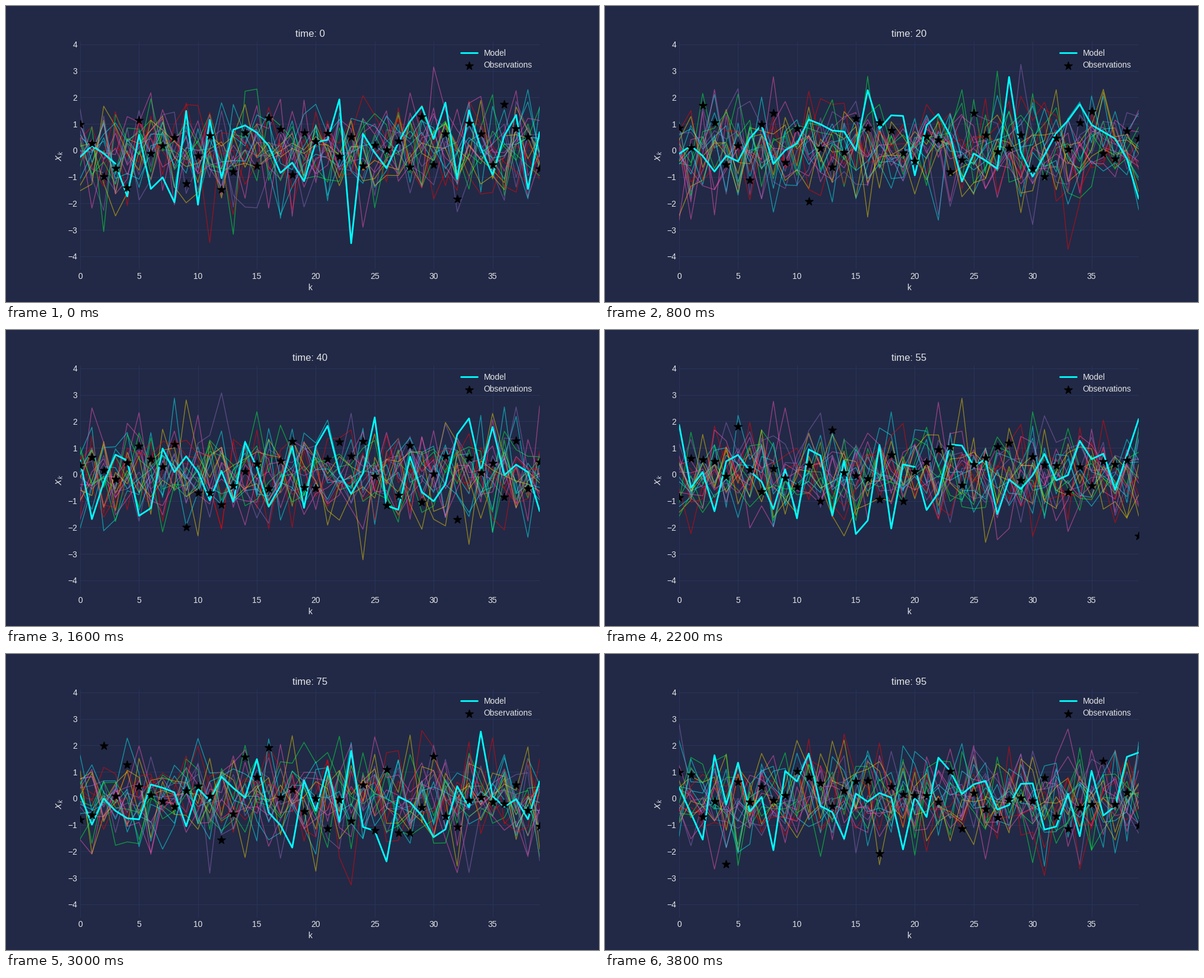
Write a matplotlib script that moves like this. It is 1000 by 500 pixels and loops after 4 s.

```python
import numpy as np
import matplotlib.pyplot as plt
from matplotlib.animation import FuncAnimation

FRAMES, STEP, INTERVAL = 20, 5, 200
SITES, MEMBERS = 40, 20
BG, GRID, TEXT = "#212946", "#2A3459", "0.9"
COLORS = ["#08F7FE", "#FE53BB", "#F5D300", "#00FF41", "red", "#9467BD"]

plt.rcParams.update({
    "font.family": "Liberation Sans",
    "mathtext.fontset": "dejavusans",
    "text.color": TEXT,
    "axes.labelcolor": TEXT,
    "xtick.color": TEXT,
    "ytick.color": TEXT,
    "lines.solid_capstyle": "round",
})


def state(step):
    """Return ensemble, model and observations as seeded noise."""
    rng = np.random.default_rng(700 + step)
    ensemble = rng.normal(0, .95, (MEMBERS, SITES))
    model = rng.normal(0, 1, SITES)
    obs = rng.normal(0, .85, SITES)
    return ensemble, model, obs


fig, ax = plt.subplots(figsize=(10, 5), dpi=100, facecolor=BG)
fig.subplots_adjust(left=.125, right=.9, bottom=.11, top=.88)
ax.set_facecolor(BG)
ax.set_axisbelow(True)
ax.grid(color=GRID, linewidth=.8)
for spine in ax.spines.values():
    spine.set_visible(False)
ax.tick_params(length=0, pad=3.5, labelsize=10)
ax.set(xlim=(0, SITES - 1), ylim=(-4.493, 4.11),
       xticks=range(0, SITES, 5), yticks=range(-4, 5))
ax.set_xlabel("k")
ax.set_ylabel("$X_k$")
title = ax.set_title("time: 0", fontsize=12)

sites = np.arange(SITES)
flat = np.zeros(SITES)
members = [ax.plot(sites, flat, color=COLORS[i % len(COLORS)],
                   lw=1, alpha=.5)[0] for i in range(MEMBERS)]
model_line, = ax.plot(sites, flat, color="cyan", lw=2, zorder=3,
                      label="Model")
stars = ax.scatter(sites, flat, s=100, marker="*", color="black",
                   zorder=4, label="Observations")
ax.legend(loc="upper right", frameon=False, fontsize=10, scatterpoints=1)


def draw(step):
    ensemble, model, obs = state(step)
    for line, values in zip(members, ensemble):
        line.set_ydata(values)
    model_line.set_ydata(model)
    stars.set_offsets(np.column_stack([sites, obs]))
    title.set_text(f"time: {step * STEP}")
    return [*members, model_line, stars, title]


anim = FuncAnimation(fig, draw, frames=FRAMES, interval=INTERVAL,
                     init_func=lambda: draw(0), repeat=True, repeat_delay=0,
                     blit=False)
plt.show()
```
